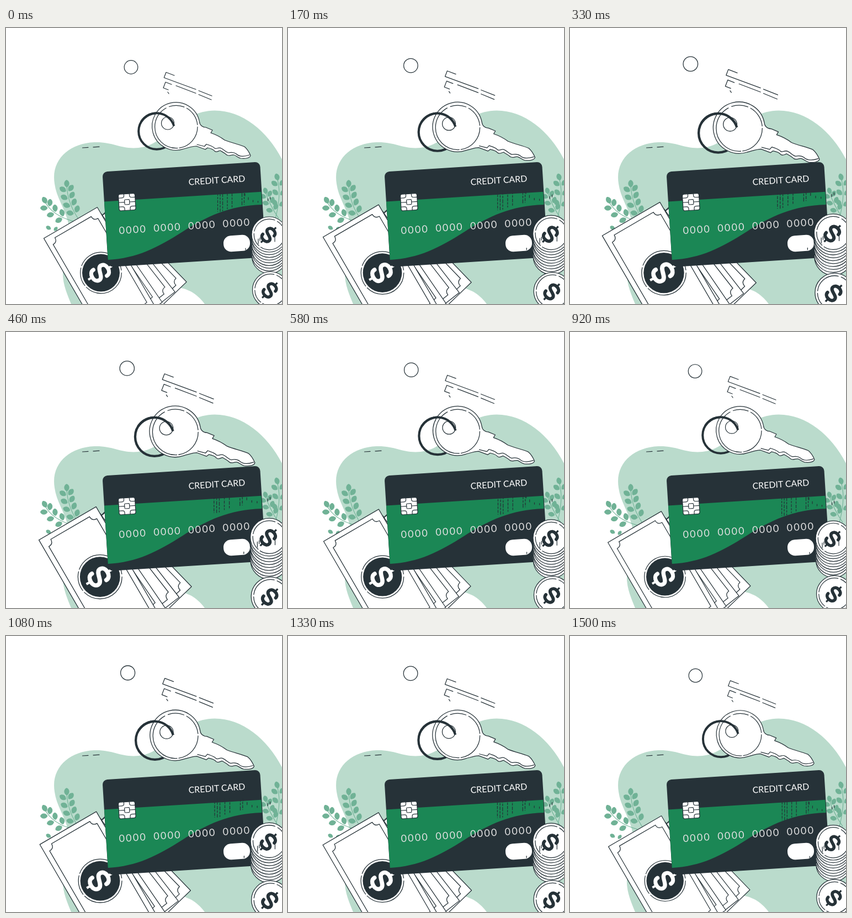
Write an HTML page that moves like this. It is 500 px wide and 500 px high and loops after 1540 ms.

```html
<!DOCTYPE html>
<html lang="en">
<head>
<meta charset="utf-8">
<title>Credit card and key</title>
<style>
html, body { margin: 0; width: 100%; height: 100%; overflow: hidden; background: #fff; }
svg { display: block; width: 100vw; height: 100vh; }
.line { fill: none; stroke: #263238; stroke-width: 1.2; stroke-linecap: round; stroke-linejoin: round; }
.paper { fill: #fff; }
.dark { fill: #263238; }
.leaf { fill: #70b296; }
.stem { fill: none; stroke: #70b296; stroke-width: 1.1; }
text { font-family: Lato, "Open Sans", sans-serif; fill: #fff; }
.digits { font-size: 18px; letter-spacing: 2.2px; fill: #e0e0e0; }
</style>
</head>
<body>
<svg viewBox="0 0 500 500">
  <defs>
    <g id="dollar" fill="none" stroke-linecap="round">
      <path stroke-width="6.4" d="M9.500 -7C9.500 -17 -9.500 -17 -9.500 -7C-9.500 2 9.500 -2 9.500 7C9.500 17 -9.500 17 -9.500 7"/>
      <path stroke-width="3.6" stroke-linecap="butt" d="M0 -22V-13M0 13V22"/>
    </g>
  </defs>

  <path fill="#badbcc" d="M88 282C81 238 115 209 160 207C196 206 207 220 240 217C292 212 314 150 378 149.500C430 150 476 188 503 244V500H360C338 470 305 463 280 478L250 500H118C111 482 102 464 103 440C107 410 119 382 112 350C106 326 91 306 88 282Z"/>
  <g id="plants"></g>
  <path class="line" d="M138.500 217L149 216.400M158 215.800L169 215.200"/>

  <g id="money"></g>

  <rect class="dark" width="286" height="173" rx="9" transform="translate(174.5 260.500) rotate(-3.600)"/>
  <path fill="#1b8755" d="M178 314.500L462.300 296.800L463.600 320C404 322 364 341 320 369C274 398 238 417 184.800 420Z"/>
  <g class="line" transform="translate(219.3 315.300) rotate(-3.600)">
    <rect class="paper" x="-15" y="-15" width="30" height="30" rx="3"/>
    <rect x="-4.500" y="-4.500" width="9" height="9" rx="1.500"/>
    <path d="M-15 -8H-9Q-5 -8 -5 -12V-15M15 -8H9Q5 -8 5 -12V-15M-15 8H-9Q-5 8 -5 12V15M15 8H9Q5 8 5 12V15M-15 0H-4.500M4.500 0H15"/>
  </g>
  <rect class="paper" x="-24" y="-14.500" width="48" height="29" rx="13.500" transform="translate(418 390) rotate(-3.600)"/>
  <text font-size="15.9" transform="translate(331 284.700) rotate(-3.600)">CREDIT CARD</text>
  <g id="number"></g>

  <g id="coins"></g>

  <g id="key">
    <circle class="line" cx="226.500" cy="71" r="12.300"/>
    <path class="line" d="M305 86L290 80.300L286.300 90L344 111.300M349 113.500L373 123M300 102.300L289 98L285 108.500L294 112M308 104.500L344 118.200M349 120.500L372 130M293 116L295 119"/>
    <circle class="line" style="stroke-width:4" cx="273" cy="187" r="32.800"/>
    <path class="line" style="fill:#fff" d="M350.500 170C351 176 356 180 362 180L374 185L371 190C380 193 388 197 396 203C408 208 420 210 432 215C437 219 440 224 443 231C442 236 433 237 425 236C420 235 417 231 413 230C408 229 405 233 400 230C396 226 391 224 388 222C384 223 381 226 378 223C375 219 370 218 365 217L361 220L345 214C338 214 330 217 322 219A43.300 43.300 0 1 1 350.500 170Z"/>
    <path class="line" d="M346 211L359.500 214.500L363 210.500C370 213 375 214 378 218C382 220 385 215 390 218C396 221 398 225 403 226C408 225 413 225 417 228C421 232 429 234 441 230"/>
    <circle class="line" cx="308.300" cy="179" r="38.700" stroke-dasharray="55 3 105 6 28 5 37 6"/>
    <circle class="line" style="fill:#fff" cx="293" cy="172.500" r="11.500"/>
    <path class="line" style="stroke-width:4;stroke-linecap:butt" d="M304.300 177.500A32.800 32.800 0 0 0 245 169.800"/>
  </g>
</svg>
<script>
const $ = id => document.getElementById(id);

const leaf = (x, y, a, l = 14) =>
  `<path class="leaf" transform="translate(${x} ${y}) rotate(${a})" d="M0 ${l / 2}C${-l * .55} ${l * .2} ${-l * .36} ${-l * .4} 0 ${-l / 2}C${l * .36} ${-l * .4} ${l * .55} ${l * .2} 0 ${l / 2}Z"/>`;

// Opposite leaves along a quadratic stem.
function sprig(x0, y0, x1, y1, x2, y2, n, size) {
  let out = `<path class="stem" d="M${x0} ${y0}Q${x1} ${y1} ${x2} ${y2}"/>`;
  for (let i = 0; i < n; i++) {
    const t = i / n, u = 1 - t;
    const x = u * u * x0 + 2 * u * t * x1 + t * t * x2;
    const y = u * u * y0 + 2 * u * t * y1 + t * t * y2;
    const dx = u * (x1 - x0) + t * (x2 - x1), dy = u * (y1 - y0) + t * (y2 - y1);
    const a = Math.atan2(dx, -dy) + Math.PI;
    if (!i) { out += leaf(x, y - 2, a * 180 / Math.PI, size); continue; }
    for (const s of [-1, 1]) {
      const b = a + s * .85;
      out += leaf(x + Math.sin(b) * size * .72, y - Math.cos(b) * size * .72, b * 180 / Math.PI, size);
    }
  }
  return out;
}

$('plants').innerHTML =
  sprig(110, 284, 111, 318, 134, 350, 5, 13.5) +
  sprig(70, 314, 84, 340, 122, 350, 4, 13.5) +
  leaf(77, 362, -60, 10) + leaf(90, 364, 40, 9) +
  sprig(491, 272, 500, 300, 488, 345, 4, 13) +
  sprig(470, 297, 476, 318, 494, 345, 4, 12);

$('number').innerHTML = [0, 1, 2, 3].map(i =>
  `<text class="digits" transform="translate(${205 + i * 62.7} ${373.2 - i * 4.1}) rotate(-3.600)">0000</text>`).join('');

// A banknote whose bottom right corner sits at x, y.
function bill(x, y, a, w, h) {
  const m = 9, n = 9, r = w - m, b = h - m;
  return `<g class="line" transform="translate(${x} ${y}) rotate(${a}) translate(${-w} ${-h})">
    <rect class="paper" width="${w}" height="${h}"/>
    <path d="M${m + n} ${m}H${r - n}Q${r - n} ${m + n} ${r} ${m + n}V${b - n}Q${r - n} ${b - n} ${r - n} ${b}H${m + n}Q${m + n} ${b - n} ${m} ${b - n}V${m + n}Q${m + n} ${m + n} ${m + n} ${m}Z"/></g>`;
}

$('money').innerHTML =
  bill(327, 460, -44, 111, 193) + bill(306, 478, -38, 111, 190) +
  bill(283, 497, -34.5, 111, 195) + bill(272, 508, -30.2, 112, 212) +
  `<circle class="line" cx="172" cy="443.500" r="37.300" stroke-dasharray="88 4 34 4 70 5 24 5"/>
   <circle class="dark" cx="172" cy="443.500" r="34"/>
   <use href="#dollar" stroke="#fff" transform="translate(170.5 443.500) rotate(60) scale(1.130)"/>`;

function coin(x, y, r) {
  return `<circle class="line" style="fill:#fff" cx="${x}" cy="${y}" r="${r}"/>
    <circle class="line" cx="${x}" cy="${y}" r="${r - 4.2}" stroke-dasharray="60 4 25 4 48 5 24 4"/>
    <use href="#dollar" stroke="#263238" transform="translate(${x - 1.5} ${y + 1}) rotate(45) scale(.880)"/>`;
}

let pile = '';
for (let i = 8; i > 0; i--)
  pile += `<circle class="line" style="fill:#fff" cx="${477.3 - i % 2 * .6}" cy="${374 + i * 4.9}" r="31.800"/>`;
const bars = [[383.5, 333], [388, 334], [392.5, 332], [401, 328], [409.5, 325], [427.5, 321], [431.5, 320]]
  .map(([x, y], i) => `<path class="line" style="stroke-linecap:butt" stroke-dasharray="${5 + i % 3} 2 4 2" d="M${x} 299V${y}"/>`).join('');
$('coins').innerHTML = bars +
  '<path class="line" d="M433 300V304M439 307V311M447.500 312V315M456.500 313.500V316M474.500 309V313M478.500 306V310M434 399V402"/>' +
  pile + coin(477, 374, 32) + coin(479.3, 474.3, 32.8) +
  '<path class="line" d="M457 382V391M460 380V385M487 376V387"/>';

const beat = [[0, 1], [330, 1.078], [385, 1.092], [580, 1.032], [725, 1.005], [880, .992],
  [920, 1], [1080, 1.056], [1170, 1.085], [1330, 1.043], [1500, .991], [1540, .993]];
const pivots = { key: [330, 146], money: [197, 442], coins: [480, 407] };
const LOOP = 1540, STEP = LOOP / 37;

function scaleAt(t) {
  const i = Math.max(1, beat.findIndex(b => b[0] >= t));
  const [t0, a] = beat[i - 1], [t1, b] = beat[i];
  return a + (b - a) * (t - t0) / (t1 - t0);
}

function draw(ms) {
  const t = Math.min(36, Math.floor((ms % LOOP + 4) / STEP)) * STEP;
  const k = scaleAt(t);
  for (const id in pivots) {
    const [x, y] = pivots[id];
    $(id).setAttribute('transform', `translate(${x * (1 - k)} ${y * (1 - k)}) scale(${k})`);
  }
}

let start;
function tick(now) {
  start ??= now;
  draw(now - start);
  requestAnimationFrame(tick);
}
draw(0);
requestAnimationFrame(tick);
</script>
</body>
</html>
```
